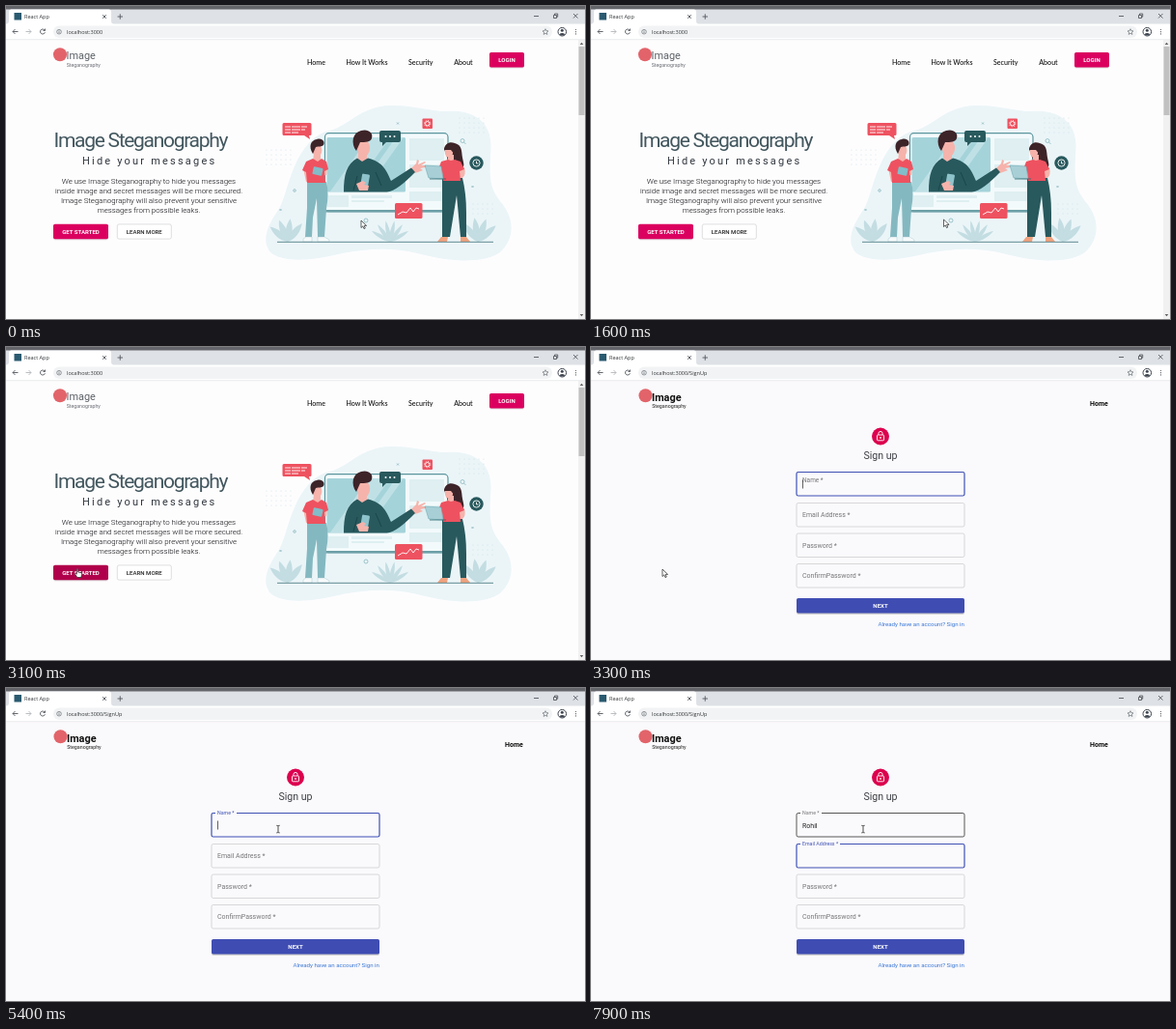
An HTML page that plays this animation: 600x324 px, repeating every 8 s.

```html
<!DOCTYPE html>
<html lang="en">
<head>
<meta charset="utf-8">
<title>React App</title>
<style>
html, body { margin: 0; height: 100%; overflow: hidden; background: #fefdfe; }
svg { display: block; width: 100vw; height: 100vh; font-family: Roboto, sans-serif; }
.ui { font: 5.5px "Open Sans", sans-serif; fill: #303336; }
.nav { font: 500 7.1px Lato, sans-serif; fill: #111; }
.btn { font-size: 6.05px; font-weight: 700; text-anchor: middle; fill: #fff; }
.line { fill: none; stroke: #555a60; stroke-width: .9; }
.body { font-size: 7.88px; font-weight: 300; text-anchor: middle; fill: #08080c; }
.skin { fill: #f6b3ab; }
.hair { fill: #3d2429; }
.red { fill: #ee5260; }
.dark { fill: #28595d; }
.white { fill: none; stroke: #fff; stroke-width: .9; }
</style>
</head>
<body>
<svg viewBox="0 0 600 324">
  <g id="home">
    <rect width="600" height="324" fill="#fefdfe"/>
    <circle cx="56" cy="50.300" r="7" fill="#e2646a"/>
    <text x="62.500" y="55.300" font-size="10.900" fill="#5d6268">Image</text>
    <text x="62.700" y="63" font-size="5.250" fill="#6a6e74">Steganography</text>
    <g class="nav">
      <text x="312" y="60.600">Home</text>
      <text x="352.500" y="60.600">How It Works</text>
      <text x="417" y="60.600">Security</text>
      <text x="464.300" y="60.600">About</text>
    </g>
    <rect x="501" y="48.500" width="36" height="16" rx="1.800" fill="#bbb" opacity=".5"/>
    <rect x="501" y="48" width="36" height="15.500" rx="1.800" fill="#db005f"/>
    <text class="btn" x="519" y="58">LOGIN</text>

    <text x="49.500" y="146" font-size="21" letter-spacing="-1.290" fill="#42575e">Image Steganography</text>
    <text x="79" y="164.200" font-size="11" letter-spacing="2.200" fill="#30373e">Hide your messages</text>
    <g class="body">
      <text x="148" y="183.600">We use Image Steganography to hide you messages</text>
      <text x="148" y="193.800">inside image and secret messages will be more secured.</text>
      <text x="148" y="204">Image Steganography will also prevent your sensitive</text>
      <text x="148" y="214.200">messages from possible leaks.</text>
    </g>
    <rect x="49" y="226.200" width="57" height="16" rx="1.800" fill="#bbb" opacity=".5"/>
    <rect id="start" x="49" y="225.700" width="57" height="15.500" rx="1.800"/>
    <text class="btn" x="77.500" y="235.500">GET STARTED</text>
    <rect x="115.300" y="225.900" width="56" height="15.200" rx="1.800" fill="#fff" stroke="#c8c8ca" stroke-width=".6"/>
    <text class="btn" x="143.300" y="235.500" style="fill:#222;font-weight:500">LEARN MORE</text>

    <!-- illustration -->
    <path fill="#ebf5f8" d="M331 130C354 126 362 108 391 103.500C420 101 436 109 456 109C480 107 503 116 502.500 146C501 175 500 187 512 202C527 219 528 240 512 255C494 268 458 264 430 257C400 249 372 251 344 257C316 264 285 266 273 254C263 239 275 222 284 208C293 190 298 143 331 130Z"/>
    <g id="dots" fill="#c3dde2"></g>
    <g fill="#c3dde2" id="plants"></g>
    <rect x="330.500" y="131.700" width="127.500" height="81" rx="4" fill="#f3fafb" stroke="#5b969e" stroke-width="1.200"/>
    <path stroke="#6da0a7" stroke-width="2.400" d="M331 212.300H458"/>
    <rect x="332.500" y="136" width="81.500" height="56.500" rx="1.500" fill="#a5d3da"/>
    <path fill="#bfe1e6" d="M376 136h22l-40 56h-22zM404 136h8l-40 56h-8z"/>
    <path fill="#dfeff2" d="M418 137h36v23h-36zM418 164h36v24h-36zM333 196h22v12h-22zM358 196h42v3h-42zM358 201h34v2h-34zM418 192h36v10h-36z"/>
    <!-- presenter -->
    <path class="skin" d="M365 152h9v7l-4 3-5-3zM420 168l5-5 1-4 2 1-1 4 7-3 1 1-5 3h5v2l-6 1 3 2-8 3z"/>
    <path class="dark" d="M350 192.500C350 174 353 164 364 157.500L369 161 375 157.500C391 161 395 172 399 181L420 167.500 424 172C413 183 402 193 394 192.500Z"/>
    <ellipse class="skin" cx="370.500" cy="147" rx="6.600" ry="9"/>
    <path class="hair" d="M363 150c-6-8-4-19 5-21 7-2 13 2 11 8-1 4-7 4-12 4z"/>
    <path fill="none" stroke="#143f43" stroke-width=".7" d="M364 176l-4 15M383 172l6 14"/>
    <rect x="368" y="174" width="8" height="14" rx="1.300" fill="#8fc3cc" transform="rotate(10 372 181)"/>
    <path class="skin" d="M363 184l7-3 3 2-2 2 5 1-1 5h-9z"/>
    <!-- visitor on the left -->
    <path fill="#84b8c0" d="M312 182h20q3 12 0 28l-2 29h-7l-1-40-4 20-1 20h-7l2-30z"/>
    <path fill="#f7fafa" stroke="#9fc3ca" stroke-width=".4" d="M308 244v-3l3-2h6v5zM323 244v-5h7l5 3v2z"/>
    <path class="skin" d="M319 153h7v7l-4 2-4-2zM308 168l5 1 3 8 9-5 2 3-11 8-5-1zM329 168l4-1-1 8-6 1z"/>
    <path class="red" d="M311 161l7-3 5 3 4-3 5 3 2 8-4 2 1 12h-19l-1-11-4-2z"/>
    <ellipse class="skin" cx="322.500" cy="149.500" rx="4.800" ry="6.600"/>
    <path class="hair" d="M318 153c-5-8-2-14 4-15 6-2 9 3 7 6-2 2-5 1-8 2z"/>
    <rect x="318" y="167" width="10" height="8" rx="1" fill="#82bdc9" transform="rotate(12 323 171)"/>
    <!-- visitor on the right -->
    <path class="hair" d="M454 148c1-6 6-8 11-6 8 2 7 9 8 15s3 8-1 12l-12-4z"/>
    <path class="dark" d="M452 178h21q4 16 4 36v25h-6l-4-43-7 43h-8q0-31 0-61z"/>
    <path fill="#efa27e" d="M447 244l4-5h7l-1 5zM471 244v-5h6l4 5z"/>
    <path class="skin" d="M458 154h6v7h-6zM450 168l3 1-2 7-10 1 1-3 6-1zM470 168l5-1q2 8-2 11l-14 0v-3l10-1z"/>
    <path class="red" d="M451 161l7-2 3 1 4-1 6 2 4 8-5 2 1 10h-18l-1-10-4-2z"/>
    <ellipse class="skin" cx="459" cy="151" rx="4.200" ry="6"/>
    <path class="hair" d="M454 149c1-7 9-9 13-4l-1 10-5-6z"/>
    <path fill="#a9cfd6" stroke="#5fa2ad" stroke-width=".5" d="M434 165l17 1 2 13-15-1z"/>
    <path stroke="#2c6870" stroke-width=".8" d="M439 179h17"/>
    <path stroke="#3d6f78" stroke-width=".8" d="M281 244.300H505"/>
    <!-- badges -->
    <path class="red" d="M288 121h27q1.500 0 1.500 1.500v10q0 1.500-1.500 1.500h-1l1 4-6-4h-21q-1.500 0-1.500-1.500v-10q0-1.500 1.500-1.500z"/>
    <path class="white" stroke-dasharray="6 1 9 1" d="M289 125h24M289 128h21M289 131h14"/>
    <path class="dark" d="M389 129h18q2 0 2 2v8q0 2-2 2h-13l-4 4v-4h-1q-2 0-2-2v-8q0-2 2-2z"/>
    <path stroke="#fff" stroke-width="2" stroke-linecap="round" stroke-dasharray="0 4.500" d="M393.500 135h10"/>
    <rect class="red" x="431.500" y="116.500" width="10.500" height="10.500" rx="1"/>
    <circle class="white" cx="436.700" cy="121.700" r="2.200"/>
    <circle class="white" cx="436.700" cy="121.700" r="3.200" stroke-dasharray="1 1.510"/>
    <circle class="dark" cx="487.500" cy="162.500" r="7.200"/>
    <circle class="white" cx="487.500" cy="162.500" r="3.600"/>
    <path class="white" d="M487.500 160.500v2.500h1.800"/>
    <rect class="red" x="403" y="204" width="28.500" height="16" rx="1.500"/>
    <path class="white" d="M406 216l5-3 4 1 4-5 3 4 3-4 3 1"/>
    <g fill="none" stroke="#7fb0b8" stroke-width=".7">
      <circle cx="473" cy="139.500" r="2"/><path d="M474.500 141l2 2"/>
      <circle cx="373" cy="222" r="2"/><circle cx="299" cy="191" r="1.300"/>
      <path d="M283.500 210l2 2m0-2l-2 2M482.500 186l2 2m0-2l-2 2M405 120.500l2 2m0-2l-2 2"/>
    </g>
    <!-- scroll bar -->
    <rect x="593" y="35" width="7" height="289" fill="#f1f1f1"/>
    <rect x="593.500" y="42" width="6" height="71" fill="#c1c1c1"/>
    <path fill="#606060" d="M594.700 40l1.800-2.200 1.800 2.200zM594.700 319l1.800 2.200 1.800-2.200z"/>
  </g>

  <g id="signup">
    <rect width="600" height="324" fill="#faf9fb"/>
    <circle cx="56.500" cy="50.300" r="7" fill="#e2646a"/>
    <text x="63" y="55.500" font-size="10.900" font-weight="700" fill="#111">Image</text>
    <text x="63.200" y="63.300" font-size="5.300" fill="#222">Steganography</text>
    <text x="517" y="60.500" font-size="7" font-weight="700" fill="#111">Home</text>
    <circle cx="300" cy="92.500" r="9" fill="#dc004e"/>
    <g fill="none" stroke="#fff" stroke-width=".9">
      <rect x="296.500" y="91" width="7" height="5.800" rx=".7"/>
      <path d="M297.900 91v-1.500a2.100 2.100 0 0 1 4.200 0v1.500"/>
    </g>
    <circle cx="300" cy="93.900" r=".9" fill="#fff"/>
    <text x="300" y="115.600" font-size="10.600" text-anchor="middle" fill="#3c3f44">Sign up</text>
    <g id="fields"></g>
    <text id="typed" x="219" y="144.500" font-size="7" fill="#222"></text>
    <rect id="caret" width=".7" height="9" fill="#222"/>
    <rect x="213" y="261" width="174" height="15.700" rx="1.800" fill="#999" opacity=".5"/>
    <rect x="213" y="260" width="174" height="15.500" rx="1.800" fill="#3f4db3"/>
    <text class="btn" x="300" y="270">NEXT</text>
    <text x="387" y="289" font-size="6.150" text-anchor="end" fill="#3b78d8">Already have an account? Sign in</text>
  </g>

  <!-- browser window -->
  <rect width="600" height="19" fill="#dee1e6"/>
  <rect width="600" height="3.500" fill="#64656b"/>
  <path fill="#fff" d="M0 18.500q3 0 3-3V6q0-2.500 2.500-2.500h101q2.500 0 2.500 2.500v9.500q0 3 3 3H600V35H0z"/>
  <rect x="8.500" y="7" width="7.500" height="7.500" fill="#2a5a70"/>
  <text class="ui" x="19" y="13">React App</text>
  <path class="line" d="M100.200 9.200l3.600 3.600m0-3.600l-3.600 3.600M115.500 11h5.500m-2.750-2.750v5.500M547 10.500h5M567.500 9.500h3v3h-3zM568.500 9v-1h3.200v3.200h-.9M588 8l4.500 4.500m0-4.500L588 12.500"/>
  <path class="line" d="M12.500 26.500h-5.500l2.500-2.500m-2.500 2.500l2.500 2.500"/>
  <path class="line" style="stroke:#b5b8bc" d="M20.500 26.500h5.500l-2.500-2.500m2.500 2.500l-2.500 2.500"/>
  <path class="line" d="M40 25a2.500 2.500 0 1 0 .4 2.200M40.500 23.500v2h-2"/>
  <rect x="49" y="20.500" width="517" height="12.500" rx="6.200" fill="#f1f3f4"/>
  <circle class="line" style="stroke-width:.6" cx="55" cy="26.700" r="2.300"/>
  <path class="line" style="stroke-width:.7" d="M55 26.200v1.800M55 24.900v.6"/>
  <text class="ui" id="url" x="63" y="28.700"></text>
  <path class="line" style="stroke-width:.6" d="M559 23.700l.9 2 2.100.2-1.600 1.400.5 2.100-1.900-1.100-1.900 1.100.5-2.100-1.600-1.400 2.100-.2z"/>
  <circle cx="576.300" cy="26.700" r="4.300" fill="#fff" stroke="#3f4650"/>
  <circle cx="576.300" cy="25.300" r="1.500" fill="#3f4650"/>
  <path fill="#3f4650" d="M573.300 29.200q3-2.600 6 0-3 2.600-6 0z"/>
  <path stroke="#555a60" stroke-width="1.200" stroke-linecap="round" stroke-dasharray="0 2.200" d="M590.500 24.500v5"/>
  <path stroke="#dcdee1" stroke-width=".6" d="M0 34.700h600"/>

  <g id="pointer" stroke-linejoin="round">
    <path id="arrow" fill="#fff" stroke="#222" stroke-width=".7" d="M0 0v7.500l1.800-1.600 1.200 2.700 1.300-.6-1.200-2.600h2.500z"/>
    <path id="beam" fill="none" stroke="#222" stroke-width=".8" d="M-1.700-3.700q1.700 0 1.700.7 0-.7 1.700-.7M0-3v6.200M-1.700 3.900q1.700 0 1.700-.7 0 .7 1.700.7"/>
    <path id="hand" fill="#fff" stroke="#222" stroke-width=".7" d="M-.7 0q.7-.8 1.400 0v3l3.300.7q.7.300.6 1.300l-.7 3.500h-4l-2.500-3.500q.5-1.100 1.900.2z"/>
  </g>
</svg>
<script>
const $ = id => document.getElementById(id);
const clamp = v => Math.min(1, Math.max(0, v));
const show = (id, on) => $(id).style.display = on ? "" : "none";

// Dotted grids and leafy plants
const grid = (x, y, cols, rows) => {
  for (let i = 0; i < cols * rows; i++)
    $("dots").innerHTML += `<circle cx="${x + i % cols * 5}" cy="${y + Math.floor(i / cols) * 5}" r=".5"/>`;
};
grid(270, 149, 6, 4);
grid(470, 116, 6, 4);
grid(484, 205, 5, 3);

const plant = (x, width, height, angles) => {
  for (const a of angles)
    $("plants").innerHTML += `<path transform="translate(${x} 244) rotate(${a}) scale(${width} ${height})" d="M0 0C-1-.3-.8-.7 0-1C.8-.7 1-.3 0 0Z"/>`;
};
plant(292, 5, 24, [-50, -22, 6, 38]);
plant(398, 3, 22, [-60, -36, -12, 12, 36, 60]);
plant(489, 5, 25, [-38, -8, 20, 48]);

// Form fields: top edge, label, floating label width, focus start and end
const fields = [
  [129.5, "Name", 22, 3270, 7270],
  [161.5, "Email Address", 41, 7270, 8000],
  [193, "Password"],
  [224.5, "ConfirmPassword"]
];
$("fields").innerHTML = fields.map(([y, label]) =>
  `<g><rect x="213" y="${y}" width="174" height="24.500" rx="1.800" fill="none"/>
  <rect x="217" y="${y - 1}" height="2" fill="#faf9fb"/><text x="219">${label} *</text></g>`).join("");

function drawField([y, , gap, from = Infinity, to], i, t) {
  const [box, notch, label] = $("fields").children[i].children;
  const p = 1 - (1 - clamp((t - from) / 200)) ** 2.2;
  const focus = t >= from && t < to;
  const left = t >= to;
  box.setAttribute("stroke", focus ? "#3f51b5" : left ? "#222" : "#c2c1c4");
  box.setAttribute("stroke-width", focus ? 1.2 : left ? .75 : .6);
  notch.setAttribute("width", gap ? gap * clamp((t - from - 50) / 100) : 0);
  label.setAttribute("y", y + 14.6 - 12.8 * p);
  label.setAttribute("font-size", 7 - 1.75 * p);
  label.setAttribute("fill", focus && p > .5 ? "#3f51b5" : "#77777a");
}

const name = "Rohil";
const keys = [5800, 5900, 6100, 6200, 6400];
const inputs = [3205, ...keys, 7300];
const path = [
  [0, 368, 222], [1500, 368, 222], [1600, 365.5, 221], [2400, 76, 203.5], [2500, 76, 203.5],
  [2800, 74, 230], [3400, 74, 230], [4100, 282, 146], [8000, 282, 146]
];

function pointerAt(t) {
  const i = path.findIndex(k => k[0] > t);
  const [t0, x0, y0] = path[i - 1], [t1, x1, y1] = path[i];
  const p = (t - t0) / (t1 - t0), e = p * p * (3 - 2 * p);
  return [x0 + (x1 - x0) * e, y0 + (y1 - y0) * e];
}

function draw(t) {
  const form = t >= 3300;
  show("home", !form);
  show("signup", form);
  $("url").textContent = "localhost:3000" + (t >= 3200 ? "/SignUp" : "");

  const [x, y] = pointerAt(t);
  const onButton = !form && x > 49 && x < 106 && y > 226 && y < 242;
  const onText = form
    ? x > 213 && fields.some(f => y > f[0] && y < f[0] + 24.5)
    : x > 50 && x < 245 && y > 177 && y < 216;
  $("pointer").setAttribute("transform", `translate(${x} ${y})`);
  show("hand", onButton);
  show("beam", onText);
  show("arrow", !onButton && !onText);
  $("start").setAttribute("fill", onButton ? "#b0004b" : "#db005f");

  fields.forEach((f, i) => drawField(f, i, t));
  $("typed").textContent = name.slice(0, keys.filter(k => k <= t).length);
  const last = inputs.filter(k => k <= t).pop();
  show("caret", Math.floor((t - last) / 533) % 2 === 0);
  const inName = t < 7300;
  $("caret").setAttribute("x", 219 + (inName && form ? $("typed").getComputedTextLength() : 0));
  $("caret").setAttribute("y", inName ? 137.5 : 169.5);
}

function tick() {
  draw(Math.floor(performance.now() % 8000 / 100) * 100);
  requestAnimationFrame(tick);
}
tick();
</script>
</body>
</html>
```
